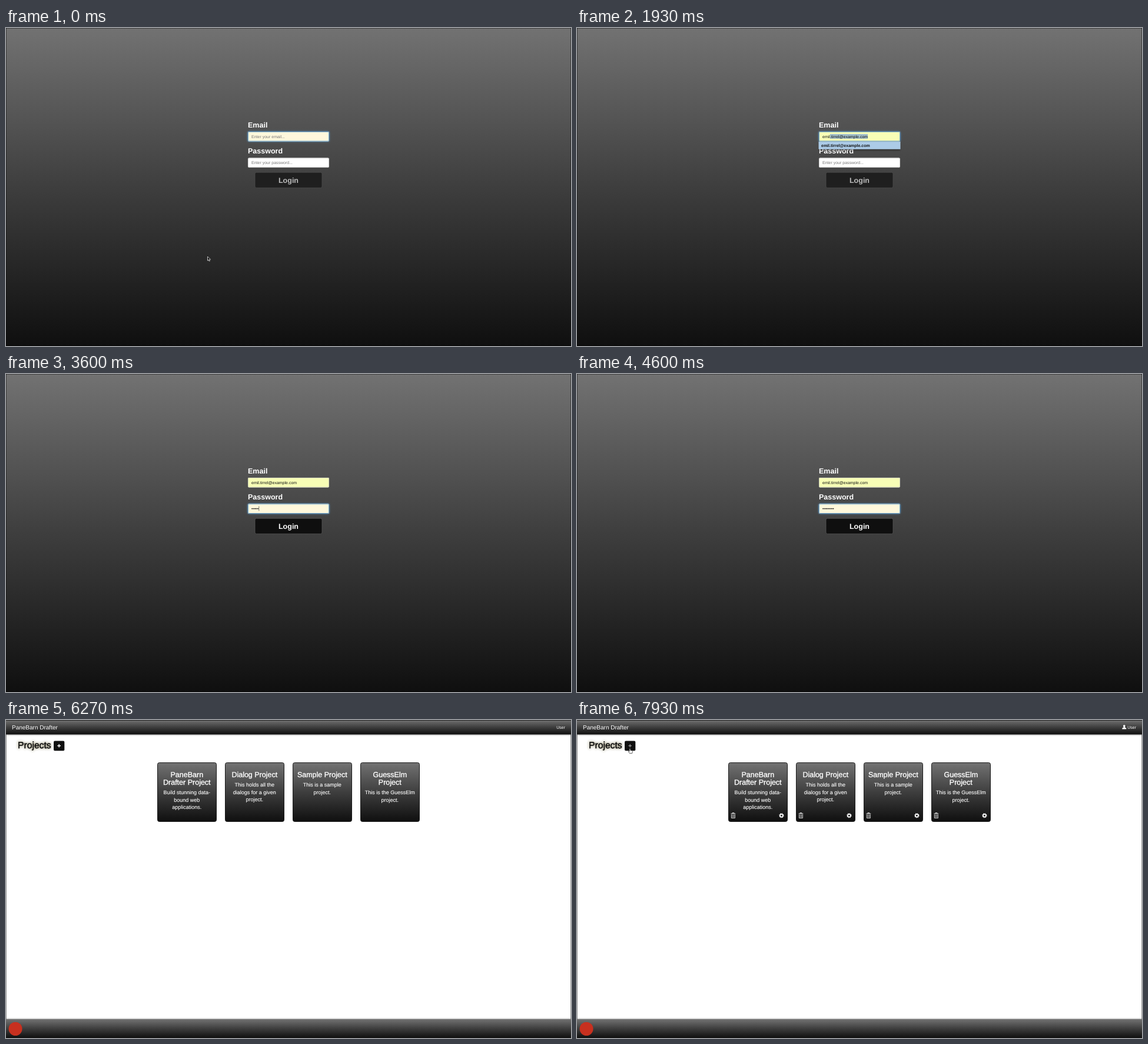
Animation of 960x540 px, one loop 8000 ms. Source, as an HTML page:

```html
<!DOCTYPE html>
<html lang="en">
<head>
<meta charset="utf-8">
<title>Login and projects</title>
<style>
  html, body { margin: 0; width: 100%; height: 100%; overflow: hidden; background: #000; }
  svg { display: block; width: 100vw; height: 100vh; }
  text { font-family: "Liberation Sans", Arial, Helvetica, sans-serif; text-rendering: geometricPrecision; white-space: pre; }
  .label { font-size: 12.5px; font-weight: bold; fill: #fff; }
  .small { font-size: 7px; fill: #111; }
  .hint { font-size: 7px; fill: #777; }
  .middle { text-anchor: middle; }
  .cardTitle { font-size: 12.5px; fill: #fff; stroke: #fff; stroke-width: .35px; }
  .cardText { font-size: 9px; fill: #fff; stroke: #fff; stroke-width: .12px; }
  .heading { font-size: 15.7px; fill: #111; stroke: #111; stroke-width: .55px; }
  .caret { fill: #222; }
</style>
</head>
<body>
<svg viewBox="0 0 960 540" preserveAspectRatio="none">
  <defs>
    <linearGradient id="shade" x1="0" y1="0" x2="0" y2="1">
      <stop offset="0" stop-color="#727272"/>
      <stop offset=".5" stop-color="#3e3e3e"/>
      <stop offset="1" stop-color="#0f0f0f"/>
    </linearGradient>
    <filter id="blur" x="-20%" y="-100%" width="140%" height="300%"><feGaussianBlur stdDeviation="1.5"/></filter>
    <filter id="halo" x="-20%" y="-60%" width="140%" height="220%"><feGaussianBlur stdDeviation="2"/></filter>
  </defs>

  <!-- data-show lists the from-to spans, in ms, in which a part is visible -->
  <g data-show="0-6270">
    <rect width="960" height="540" fill="url(#shade)"/>
    <path d="M0 .5H960M.5 0V540M959.5 0V540M0 539.5H960" stroke="#000" stroke-opacity=".45"/>

    <text class="label" x="411" y="168.5">Email</text>
    <text class="label" x="411" y="213.3">Password</text>

    <g id="emailGlow">
      <rect x="410.5" y="175.5" width="139" height="17.5" rx="2.5" fill="#52a8ec" filter="url(#blur)"/>
    </g>
    <rect x="411" y="176" width="138" height="16.5" rx="2" fill="#fff"/>
    <rect x="411" y="176" width="138" height="16.5" rx="2" fill="#fff8dc" data-show="0-1930"/>
    <rect x="411" y="176" width="138" height="16.5" rx="2" fill="#f8feb6" data-show="1930-6270"/>
    <rect x="411.4" y="176.4" width="137.2" height="15.7" rx="2" fill="none" stroke="#bbb" stroke-width=".7"/>
    <rect id="emailEdge" x="411.4" y="176.4" width="137.2" height="15.7" rx="2" fill="none" stroke="#5a9fd0" stroke-width=".8"/>
    <rect id="selection" y="180" height="8" fill="#a3bfca" data-show="1930-2270"/>
    <text class="hint" x="417" y="186.5" data-show="0-530">Enter your email...</text>
    <text class="small" id="email" x="417" y="186.5"></text>
    <rect class="caret" id="emailCaret" y="180" width=".6" height="8" data-show="270-1600"/>

    <g id="passwordGlow">
      <rect x="410.5" y="220" width="139" height="17.5" rx="2.5" fill="#52a8ec" filter="url(#blur)"/>
    </g>
    <rect x="411" y="220.5" width="138" height="16.5" rx="2" fill="#fff"/>
    <rect x="411" y="220.5" width="138" height="16.5" rx="2" fill="#fff8dc" data-show="2270-6000"/>
    <rect x="411.4" y="220.9" width="137.2" height="15.7" rx="2" fill="none" stroke="#bbb" stroke-width=".7"/>
    <rect id="passwordEdge" x="411.4" y="220.9" width="137.2" height="15.7" rx="2" fill="none" stroke="#5a9fd0" stroke-width=".8"/>
    <text class="hint" x="417" y="231" data-show="0-2870">Enter your password...</text>
    <text class="small" id="password" x="417" y="231"></text>
    <rect class="caret" id="passwordCaret" y="224.5" width=".6" height="8" data-show="2400-4600 5070-5600"/>

    <g data-show="1930-2270">
      <rect x="411" y="194" width="138" height="14" fill="#000" opacity=".3" filter="url(#blur)"/>
      <rect x="410.5" y="192.8" width="139" height="13" fill="#accbe7"/>
      <path d="M411 193H549" stroke="#6f8fae" stroke-width=".6" stroke-dasharray="1 1"/>
      <text class="small" id="suggestion" x="415" y="201.9" font-weight="bold"></text>
    </g>

    <g data-show="0-2870">
      <rect x="423" y="245.2" width="114" height="26.2" rx="2.5" fill="#1f1f1f" stroke="#4c4c4c" stroke-width=".8"/>
      <text class="label middle" x="480" y="263" style="fill:#bcbcbc">Login</text>
    </g>
    <g data-show="2870-6270">
      <rect x="423" y="245.2" width="114" height="26.2" rx="2.5" fill="#0f0f0f" stroke="#565656" stroke-width=".8"/>
      <text class="label middle" x="480" y="263">Login</text>
    </g>
  </g>

  <g data-show="6270-8000">
    <rect width="960" height="540" fill="#fff"/>
    <path d="M.5 0V540M959.5 0V540" stroke="#999"/>

    <rect width="960" height="24" y="1" fill="#000" opacity=".5" filter="url(#blur)"/>
    <rect width="960" height="24.5" fill="url(#shade)"/>
    <path d="M0 .5H960" stroke="#222"/>
    <text x="10" y="16" font-size="10" fill="#fff" id="brand"></text>
    <text x="950" y="15" font-size="7" fill="#fff" text-anchor="end">User</text>
    <path data-show="6330-8000" fill="#fff" d="M926.3 15.6V14.3Q926.6 13.3 928.8 12.6V12Q927.9 11.200 928 9.800Q928.200 8.300 929.800 8.300T931.600 9.800Q931.700 11.200 930.800 12V12.600Q933 13.300 933.300 14.300V15.600Z"/>

    <text class="heading" x="20" y="48.200" style="fill:#8d8560;stroke:#8d8560;stroke-width:2px" opacity=".6" filter="url(#halo)">Projects</text>
    <text class="heading" x="20" y="48.200">Projects</text>
    <rect x="81" y="35.500" width="18.300" height="16.800" rx="2" fill="#0f0f0f"/>
    <path d="M87.300 43.800H93M90.150 41V46.600" stroke="#fff" stroke-width="1.500" data-show="6270-7870"/>
    <path d="M87.400 43.800H92.900M90.150 41V46.500" stroke="#bbb" stroke-width="1" data-show="7870-8000"/>

    <g id="cards"></g>

    <rect y="508" width="960" height="32" fill="#000" opacity=".6" filter="url(#blur)"/>
    <rect y="508" width="960" height="32" fill="url(#shade)"/>
    <circle cx="16" cy="524.500" r="11.500" fill="#c8301f"/>
  </g>

  <path id="arrow" d="M0 0V7L1.600 5.600L2.700 8L3.900 7.500L2.900 5.100H5Z" fill="#111" stroke="#fff" stroke-width=".7" stroke-linejoin="round"/>
  <path id="hand" d="M-.9 .6Q0 -.6 .8 .6V3L3.600 3.600Q4.600 4 4.400 5.200L3.600 8.200H-.6L-2.600 5.200Q-2.800 4 -1.700 4.300L-.9 5Z" fill="#fff" stroke="#222" stroke-width=".7" stroke-linejoin="round"/>
</svg>

<script>
const LOOP = 8000;
const BRAND = ["PaneBarn", "Drafter"];
const ADDRESS = "emil.tirrel@example.com";
const $ = id => document.getElementById(id);

const emailKeys = [530, 730, 930, 1070];
const passwordKeys = [2870, 3000, 3200, 3330, 3600, 3800, 3870, 4070];

// time, x, y and, over the button, the hand
const pointer = [
  [0, 342.5, 388], [530], [7000, 334, 386], [7070, 286, 316], [7130, 206, 222],
  [7200, 118, 138], [7270, 56, 92], [7330, 25.5, 70], [7400, 66, 62], [7470, 98, 59],
  [7800, 95, 54], [7870, 91, 49.500, true], [7930, 90, 48.500, true]
];

const cards = [
  [[BRAND[0], BRAND[1] + " Project"], ["Build stunning data-", "bound web", "applications."]],
  [["Dialog Project"], ["This holds all the", "dialogs for a given", "project."]],
  [["Sample Project"], ["This is a sample", "project."]],
  [["GuessElm", "Project"], ["This is the GuessElm", "project."]]
];

const lines = (list, style, y, step) => list.map((line, i) =>
  `<text class="${style} middle" x="50.300" y="${y + i * step}">${line}</text>`).join("");

const icons = `<g data-show="6330-8000" fill="none" stroke="#fff">
  <path d="M4.500 87H12.300M7 87V85.700H9.800V87" stroke-width=".9"/>
  <path d="M5.400 88.300V94.500H11.400V88.300M7.300 88.500V93.500M9.500 88.500V93.500" stroke-width=".8"/>
  <circle cx="90.400" cy="90.300" r="2.400" stroke-width="1.700"/>
  <circle cx="90.400" cy="90.300" r="3.600" stroke-width="1.200" stroke-dasharray="1.414"/>
</g>`;

$("cards").innerHTML = cards.map(([title, body], i) => `
  <g transform="translate(${257 + i * 115} 72)">
    <rect x=".5" y=".5" width="100" height="100" rx="3" fill="url(#shade)" stroke="#1a1a1a"/>
    ${lines(title, "cardTitle", 24.500, 13)}
    ${lines(body, "cardText", 28 + title.length * 13, 12.500)}
    ${icons}
  </g>`).join("");

$("brand").textContent = BRAND.join(" ");
$("suggestion").textContent = ADDRESS;

const timed = [...document.querySelectorAll("[data-show]")].map(el => ({
  el, spans: el.dataset.show.split(" ").map(span => span.split("-").map(Number))
}));

const show = (el, on) => { el.style.display = on ? "" : "none"; };
const typed = (keys, t) => keys.filter(key => key <= t).length;
const advance = (el, count) => count ? el.getSubStringLength(0, count) : 0;

function write(el, value) {
  if (el.textContent !== value) el.textContent = value;
}

function drawFields(t) {
  const letters = typed(emailKeys, t), dots = typed(passwordKeys, t);
  const email = $("email"), password = $("password");
  write(email, t < 1930 ? ADDRESS.slice(0, letters) : ADDRESS);
  write(password, "•".repeat(dots));

  const start = 417 + advance(email, letters);
  $("emailCaret").setAttribute("x", start + .3);
  $("passwordCaret").setAttribute("x", 417.300 + advance(password, dots));
  if (t >= 1930) {
    $("selection").setAttribute("x", start);
    $("selection").setAttribute("width", 417 + advance(email, ADDRESS.length) - start);
  }

  const moved = typed([2270, 2330, 2400], t) / 3;
  const focus = { email: 1 - moved, password: t < 6000 ? moved : 0 };
  for (const name in focus) {
    $(name + "Glow").setAttribute("opacity", focus[name] * .65);
    $(name + "Edge").setAttribute("opacity", focus[name]);
  }
}

function drawPointer(t) {
  const [, x, y, over] = pointer.filter(([time]) => time <= t).pop();
  show($("arrow"), x !== undefined && !over);
  show($("hand"), over);
  if (x !== undefined) $(over ? "hand" : "arrow").setAttribute("transform", `translate(${x} ${y})`);
}

let origin;
function draw(now) {
  origin ??= now;
  const t = (now - origin) % LOOP;
  for (const { el, spans } of timed) show(el, spans.some(([from, to]) => t >= from && t < to));
  if (t < 6270) drawFields(t);
  drawPointer(t);
  requestAnimationFrame(draw);
}
requestAnimationFrame(draw);
</script>
</body>
</html>
```
